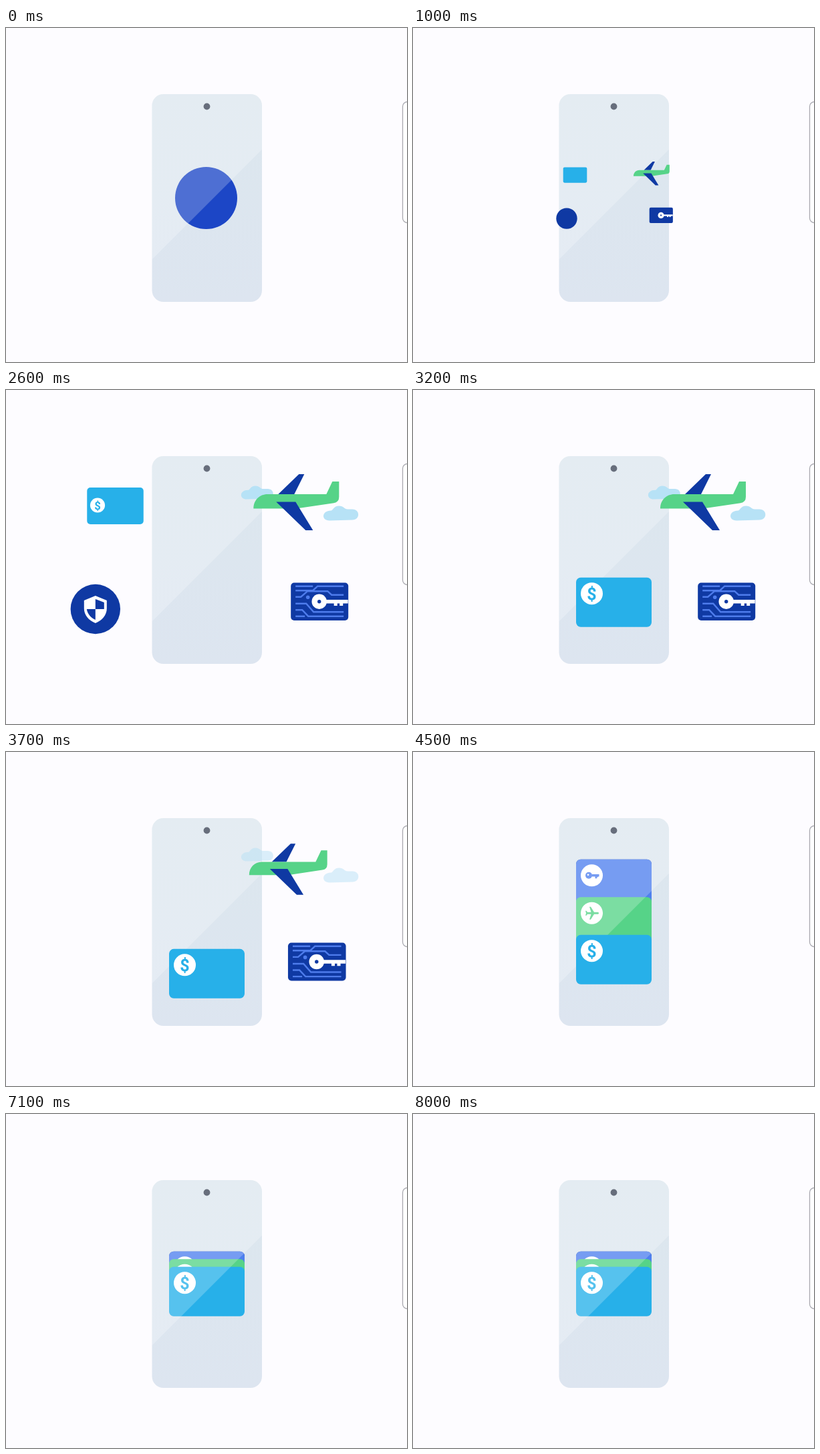
Animation, 600 px wide and 500 px high, one loop 8.1 s. Source, as an HTML page with a canvas:

```html
<!DOCTYPE html>
<html lang="en">
<head>
<meta charset="utf-8">
<title>Phone wallet</title>
<style>
html, body { margin: 0; width: 100%; height: 100%; overflow: hidden; background: #fdfcff; }
canvas { display: block; }
</style>
</head>
<body>
<canvas id="stage" width="600" height="500"></canvas>
<script>
const c = document.getElementById('stage').getContext('2d');
const LOOP = 8100, STEP = 100;
const NAVY = '#0f39a3', BLUE = '#27b0e9', GREEN = '#56d388', VIOLET = '#4f80ee';

const lerp = (a, b, p) => a + (b - a) * p;
const span = (t, a, b) => Math.min(1, Math.max(0, (t - a) / (b - a)));
const smooth = (t, a, b) => { const p = span(t, a, b); return p * p * (3 - 2 * p); };
const out = (t, a, b) => 1 - (1 - span(t, a, b)) ** 3;

// Eased value through [time, value] pairs
function track(t, keys) {
  let v = keys[0][1];
  for (let i = 1; i < keys.length; i++)
    v = lerp(v, keys[i][1], smooth(t, keys[i - 1][0], keys[i][0]));
  return v;
}

function at(x, y, scale, draw, alpha = 1) {
  if (scale <= 0 || alpha <= 0) return;
  c.save();
  c.translate(x, y);
  c.scale(scale, scale);
  c.globalAlpha *= alpha;
  draw();
  c.restore();
}

function fill(path, color) { c.fillStyle = color; c.fill(new Path2D(path)); }

function disc(x, y, r, color) {
  c.beginPath();
  c.arc(x, y, r, 0, 7);
  c.fillStyle = color;
  c.fill();
}

function box(x, y, w, h, r, color) {
  c.beginPath();
  c.roundRect(x, y, w, h, r);
  c.fillStyle = color;
  c.fill();
}

function glare(alpha) {
  c.save();
  c.beginPath();
  c.roundRect(218.5, 99, 164.5, 311, 17);
  c.clip();
  c.globalAlpha = alpha;
  fill('M218 98H383V182L218 347Z', 'rgba(255,255,255,.22)');
  c.restore();
}

function phone() {
  const g = c.createLinearGradient(0, 99, 0, 410);
  g.addColorStop(0, '#dce7ee');
  g.addColorStop(1, '#dde5f0');
  box(218.5, 99, 164.5, 311, 17, g);
}

function badge(icon) {
  disc(0, 0, 16.5, '#fff');
  icon();
}

function dollar() {
  c.fillStyle = BLUE;
  c.font = 'bold 25px Roboto, Arial, sans-serif';
  c.textAlign = 'center';
  c.fillText('$', 0, 9);
}

function jet() {
  c.rotate(Math.PI / 2);
  c.translate(-11.5, -12.5);
  fill('M21 16v-2l-8-5V3.5c0-.83-.67-1.5-1.5-1.5S10 2.67 10 3.5V9l-8 5v2l8-2.5V19l-2 1.5V22l3.5-1 3.5 1v-1.5L13 19v-5.5l8 2.5z', GREEN);
}

function smallKey() {
  disc(-4.5, 0, 5, VIOLET);
  fill('M0 -1.8H11V1.8H9.5V2.5H7.8V4.5H5V1.8H0Z', VIOLET);
  disc(-5.5, -1, 1.4, '#fff');
}

function cloud() {
  fill('M-17 11C-30 11 -29 -4 -15 -4C-12 -4 -11 -11 -3 -11C4 -11 5 -6 10 -6H17C29 -6 29 10 17 10Z', '#b7e2f6');
}

function plane() {
  fill('M-27 -12L4 -42H12L-3 -12Z', NAVY);
  fill('M-64 9.5C-64 -3 -55 -12 -43 -12H45L54 -31H64V-8Q64 0 56 1.2L0 9.5Z', GREEN);
  fill('M-30 -.5H-1L25 42H14Z', NAVY);
}

const wires = new Path2D(
  'M-36 -23H-10M-36 -16.5H-10L-3 -23H36M-36 -7H-28L-18 -15.5H12L18 -10H36' +
  'M-36 3H-20L-9 15.5H36M-36 12.5H-26L-17 22H36M-36 22H-22');

function keyDetail(t) {
  c.strokeStyle = '#4e7cec';
  c.lineWidth = 2.4;
  c.lineCap = 'butt';
  c.setLineDash([lerp(0, 95, smooth(t, 1480, 2150)), 200]);
  c.stroke(wires);
  c.setLineDash([]);
  disc(-17.5, -6.5, 2.8 * smooth(t, 1600, 2000), '#4e7cec');
  disc(-.5, 0, 11.2, '#fff');
  fill('M9 -2.7H42.5V2.7H35V6.2H30V2.7H26.5V6.2H21.5V2.7H9Z', '#fff');
  disc(-.5, 0, 2.7, NAVY);
}

function shield() {
  fill('M0 -20L17 -13V-1C17 9 10 17 0 21C-10 17 -17 9 -17 -1V-13Z', '#fff');
  fill('M0 -15V0H13V-10ZM0 0V16C-7 13 -12 7 -13 0Z', NAVY);
}

function appMark(t) {
  const s = track(t, [[0, 1], [300, 1.035], [800, 0]]);
  at(299.5, 254.5, s, () => disc(0, 0, 46.5, '#1c46c6'));
}

function keyCard(t, gap) {
  const grow = out(t, 900, 1500);
  if (!grow) return;
  const go = smooth(t, 3650, 4200);
  const w = lerp(lerp(83.5, 86, smooth(t, 1600, 2300)), 113, go);
  const h = lerp(lerp(55, 56.5, smooth(t, 1600, 2300)), 74, go);
  const x = lerp(lerp(300, 469.2, grow), 300.5, go);
  const y = lerp(lerp(254, 316.7, grow), 254.3 - gap, go);
  at(x, y, grow, () => {
    box(-w / 2, -h / 2, w, h, lerp(5, 7, go), NAVY);
    at(0, 0, w / 86, () => keyDetail(t), 1 - smooth(go, .2, .7));
    const morph = smooth(go, .2, .8);
    c.globalAlpha = morph;
    box(-w / 2, -h / 2, w, h, 7, VIOLET);
    c.globalAlpha = 1;
    at(-w / 2 + 23.5, -h / 2 + 24, smooth(go, .5, 1), () => badge(smallKey));
  });
}

function greenCard(t) {
  at(300.5, 254.2, smooth(t, 3850, 4300), () => {
    box(-56.5, -37, 113, 74, 7, GREEN);
    at(-33, -13, 1, () => badge(jet));
  });
}

function blueCard(t, gap) {
  const grow = out(t, 900, 1500);
  if (!grow) return;
  const go = out(t, 2800, 3200);
  const w = lerp(84.5, 113, go), h = lerp(55, 74, go);
  const x = lerp(lerp(300, 163.5, grow), 300.5, go);
  let y = lerp(lerp(254, 173.5, grow), 334, out(t, 2800, 3550));
  y = lerp(y, 254.2 + gap, smooth(t, 3550, 4350));
  at(x, y, grow, () => {
    box(-w / 2, -h / 2, w, h, lerp(5, 7, go), BLUE);
    at(lerp(-26.5, -33, go), lerp(-1, -13, go),
      smooth(t, 1500, 1950) * lerp(.67, 1, go), () => badge(dollar));
  });
  const shine = smooth(t, 5900, 6300);
  if (shine) {
    c.save();
    c.beginPath();
    c.roundRect(x - w / 2, y - h / 2, w, h, 7);
    c.clip();
    glare(shine);
    c.restore();
  }
}

function coin(t) {
  const grow = out(t, 900, 1500), go = smooth(t, 2750, 3150);
  at(lerp(lerp(300, 133.8, grow), 300, go), lerp(lerp(254, 328, grow), 300, go),
    grow * (1 - go), () => {
      disc(0, 0, 37.2, NAVY);
      at(0, 0, smooth(t, 1500, 1950), shield);
    });
}

function flight(t) {
  const grow = out(t, 900, 1500), go = smooth(t, 3600, 4150);
  const drift = out(t, 1600, 2800);
  const alpha = lerp(0, 1, smooth(t, 1500, 1950)) * (1 - smooth(t, 3600, 3800));
  at(lerp(356, 376, drift), 153.5, lerp(.75, .92, drift), cloud, alpha);
  const x = lerp(lerp(300, 435, grow), 300, go) - smooth(t, 1600, 3200);
  const y = lerp(lerp(254, 168, grow), 254, go);
  at(x, y, grow * (1 - go), plane);
  at(lerp(485, 501.3, drift), lerp(186, 184.5, drift), lerp(.94, 1, drift), cloud, alpha);
}

function draw(t) {
  c.fillStyle = '#fdfcff';
  c.fillRect(0, 0, 600, 500);

  c.beginPath();
  c.roundRect(593.5, 110.5, 60, 181, 7);
  c.fillStyle = '#fff';
  c.fill();
  c.strokeStyle = '#a9a9b0';
  c.lineWidth = 1.3;
  c.stroke();

  const gap = track(t, [[5500, 56.5], [5800, 65.5], [5900, 64], [6300, 11.5]]);
  phone();
  appMark(t);
  keyCard(t, gap);
  greenCard(t);
  glare(1);
  coin(t);
  flight(t);
  blueCard(t, gap);
  disc(300.5, 117.5, 4.9, '#676e7c');
}

function tick(now) {
  draw(Math.floor(now % LOOP / STEP) * STEP);
  requestAnimationFrame(tick);
}
draw(0);
requestAnimationFrame(tick);
</script>
</body>
</html>
```
